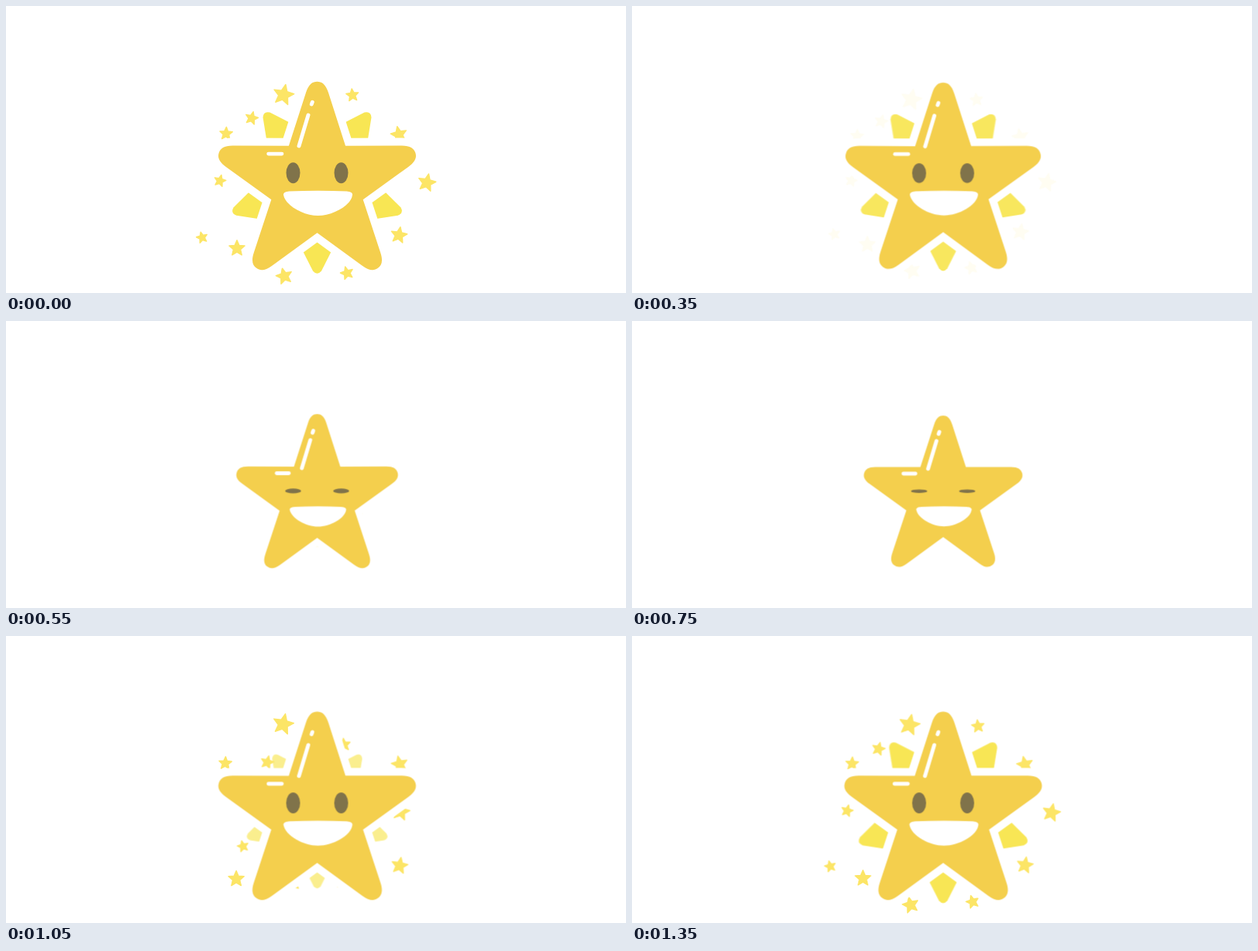
Recreate the animation shown at these times as an HTML page. Size 800x371 px, loop 1400 ms.

```html
<!DOCTYPE html>
<html lang="en">
<head>
<meta charset="utf-8">
<title>Happy star</title>
<style>
  html, body { margin: 0; width: 100%; height: 100%; overflow: hidden; background: #fff; }
  svg { display: block; width: 100%; height: 100%; }
</style>
</head>
<body>
<svg viewBox="0 0 800 371" preserveAspectRatio="xMidYMid meet">
  <g transform="translate(401.5 222.3)">
    <g id="rays" fill="#f8e654"></g>
    <g id="sparks" fill="#fce566" stroke="#fce566" stroke-width="1.4" stroke-linejoin="round"></g>
    <path id="halo" fill="#fff" stroke="#fff" stroke-linejoin="round"/>
    <path id="body" fill="#f4cf4d"/>
    <g id="shine" fill="none" stroke="#fff" stroke-width="4.9" stroke-linecap="round"></g>
    <g id="eyes" fill="#80734a"><ellipse cx="-31"/><ellipse cx="31"/></g>
    <path id="mouth" fill="#fff" d="M-44.5 1C-44.5-2-41-3-37-3.4Q0-5 37-3.4C41-3 44.5-2 44.5 1C43 15 19 28 0 28S-42 15-44.5 1Z"/>
  </g>
</svg>
<script>
const LOOP = 1400, STEP = 50, CENTER = 8.7;
const $ = id => document.getElementById(id);
const set = (el, attrs) => {
  for (const k in attrs) el.setAttribute(k, attrs[k]);
  return el;
};
const add = (parent, attrs) =>
  parent.appendChild(set(document.createElementNS('http://www.w3.org/2000/svg', 'path'), attrs));

// Easing
const span = (t, a, b) => Math.min(1, Math.max(0, (t - a) / (b - a)));
const inOut = u => u < .5 ? 4 * u ** 3 : 1 - 4 * (1 - u) ** 3;
const out = (u, power) => 1 - (1 - u) ** power;
const backIn = u => u * u * (2 * u - 1);
const backOut = u => 1 + 2.7 * (u - 1) ** 3 + 1.7 * (u - 1) ** 2;

// 0 at rest, 1 fully squeezed; each part springs back in its own time
const squeeze = (t, from, to) => inOut(span(t, 250, 660)) - inOut(span(t, from, to));
const scale = s => 1 - .197 * s;

// Five equal arms: length follows tip, thickness grows while the tip lags
function bodyPath(tip, notch) {
  const wide = notch + 3 * (notch - tip);
  let d = '';
  for (let k = 0; k < 5; k++) {
    const c = Math.cos(k * Math.PI * .4), s = Math.sin(k * Math.PI * .4);
    const at = (x, y) => `${(x * c + y * s).toFixed(2)} ${(x * s - y * c).toFixed(2)} `;
    const arm = (x, y) => at(x * wide, y * tip);
    d += (k ? 'L' : 'M') + at(-36.6 * notch, 50.3 * notch) +
      'L' + arm(-14.5, 119) + 'C' + arm(-11, 130) + arm(-6, 133.3) + arm(0, 133.3) +
      'C' + arm(6, 133.3) + arm(11, 130) + arm(14.5, 119);
  }
  return d + 'Z';
}

// Rays reach under the body, whose halo trims them
for (let k = 0; k < 5; k++)
  add($('rays'), { d: 'M-27 69L-5.5 111.5Q0 118 5.5 111.5L27 69Z', transform: `rotate(${k * 72})` });

function sparkPath(r, turn) {
  const pts = Array.from({ length: 10 }, (_, i) => {
    const a = (i * 36 + turn - 90) * Math.PI / 180, d = i % 2 ? r * .46 : r;
    return (Math.cos(a) * d).toFixed(2) + ' ' + (Math.sin(a) * d).toFixed(2);
  });
  return 'M' + pts.join('L') + 'Z';
}
const spark = ([x, y, r, turn, travel = .6]) =>
  ({ x, y, travel, el: add($('sparks'), { d: sparkPath(r, turn) }) });

// x, y, radius, turn, travel
const near = [
  [-43.5, -107.3, 13.8, 12], [-117.5, -57.3, 8.6, 3], [105.5, -56, 10.8, -12],
  [105.5, 74, 10.8, 10], [-103.5, 91, 10.6, 0]
].map(spark);
const far = [
  [45.5, -107, 8.4, -6], [-84.5, -77.3, 8.6, 14], [-125.5, 3.7, 7.8, 14],
  [-148.5, 77, 7.4, -14, .9], [-42.5, 127, 10.8, -14], [38.5, 123, 8.6, -16], [141.5, 6.2, 11.8, 12]
].map(spark);

// Middle and half extent of each highlight
const shine = [[-54.2, -31.2, 8.6, 0], [-17.5, -61.3, -6, 20], [-6.7, -96.7, -.5, 1.4]]
  .map(([x, y, dx, dy]) => ({ x, y, dx, dy, el: add($('shine'), {}) }));

function drawBody(t) {
  const tipSqueeze = squeeze(t, 770, 1015), notchSqueeze = squeeze(t, 760, 980);
  const notch = scale(notchSqueeze), shut = (tipSqueeze + notchSqueeze) / 2;
  const shape = { d: bodyPath(scale(tipSqueeze), notch), transform: `translate(0 ${CENTER * notch})` };
  set($('body'), shape);
  set($('halo'), { ...shape, 'stroke-width': 20 * notch });
  set($('mouth'), { transform: `translate(1 20.7) scale(${notch})` });
  for (const eye of $('eyes').children)
    set(eye, { cy: -6.5 + 4.2 * shut, rx: 9 + 1.5 * shut * shut, ry: 13.5 - 11.2 * shut });

  const s = scale(squeeze(t, 770, 1040)), len = (1 + s) / 2;
  for (const { x, y, dx, dy, el } of shine)
    set(el, { d: `M${x * s - dx * len} ${y * s - dy * len}L${x * s + dx * len} ${y * s + dy * len}` });
}

function drawGlow(t) {
  const ray = 1 - .5 * (inOut(span(t, 250, 660)) - out(span(t, 800, LOOP), 2));
  set($('rays'), { transform: `translate(0 ${CENTER}) scale(${ray})`, opacity: 2 * ray - 1 });

  const leaving = t < 600;
  const move = (list, ease) => list.forEach(({ x, y, travel, el }) => {
    const k = leaving ? 1 - .5 * backIn(t / 550) : 1 - travel * (1 - ease);
    set(el, { transform: `translate(${x * k} ${y * k})` });
  });
  move(near, backOut(span(t, 780, 1080)));
  move(far, out(span(t, 750, LOOP), 1.5));
  set($('sparks'), { opacity: leaving ? 1 - span(t, 75, 375) : +(t >= 800) });
}

function tick(now) {
  const t = Math.floor(now % LOOP / STEP) * STEP;
  drawBody(t);
  drawGlow(t);
  requestAnimationFrame(tick);
}
tick(0);
</script>
</body>
</html>
```
